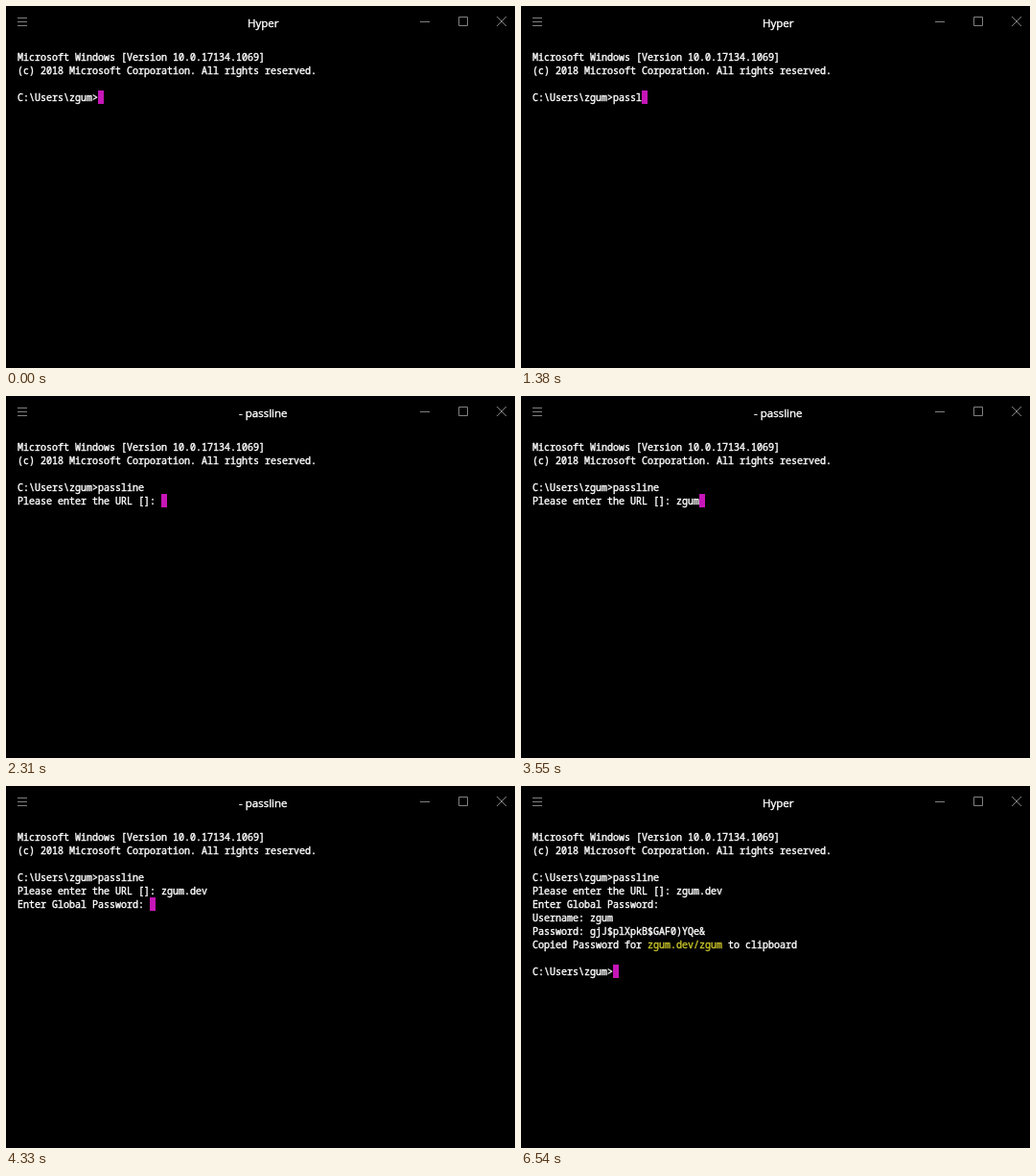
Write an HTML page that moves like this. It is 531 by 377 pixels and loops after 8 s.

```html
<!DOCTYPE html>
<html lang="en">
<head>
<meta charset="utf-8">
<title>Terminal</title>
<style>
  html, body {
    margin: 0;
    width: 100%;
    height: 100%;
    overflow: hidden;
    background: #000;
  }
  svg {
    position: absolute;
    left: 0;
    top: 0;
  }
  .icons {
    fill: none;
    stroke: #808080;
  }
  #title {
    fill: #fff;
    stroke: #fff;
    stroke-width: .4px;
    font: 500 11.5px "Open Sans", "Noto Sans", sans-serif;
    text-anchor: middle;
  }
  #screen {
    position: absolute;
    left: 12px;
    top: 46px;
    margin: 0;
    color: #fff;
    font: 500 10px/14px "Noto Sans Mono", "Liberation Mono", monospace;
    -webkit-text-stroke: .4px;
  }
  #link { color: #c7c329; }
  #cursor {
    display: inline-block;
    width: 6px;
    height: 14px;
    vertical-align: top;
    background: #c616b7;
  }
</style>
</head>
<body>
<svg width="531" height="377" viewBox="0 0 531 377">
  <g class="icons">
    <path d="M12 12.5h10M12 16.5h10M12 20.5h10"/>
    <path d="M432 16.5h10M472.5 11.5h9v9h-9z"/>
    <path d="M512 11l10 10M522 11l-10 10"/>
  </g>
  <text id="title" x="268.3" y="22">Hyper</text>
</svg>
<pre id="screen"><span id="before"></span><span id="link"></span><span id="after"></span><span id="cursor"></span></pre>
<script>
  const LOOP = 8000;
  const USER = "zgum";
  const SITE = USER + ".dev";
  const PROMPT = `C:\\Users\\${USER}>`;
  const BANNER = "Microsoft Windows [Version 10.0.17134.1069]\n" +
    "(c) 2018 Microsoft Corporation. All rights reserved.\n\n";

  const COMMAND_KEYS = [600, 750, 920, 1070, 1380, 1610, 1850, 1930];
  const SITE_KEYS = [3170, 3320, 3470, 3550, 3700, 3870, 3930, 4170];
  const START = 2080, ASK_URL = 2310, ASK_PASSWORD = 4330, ENTER = 6420, DONE = 6540;

  const el = id => document.getElementById(id);
  const typed = (text, keys, t) => text.slice(0, keys.filter(k => k <= t).length);

  function screenAt(t) {
    let before = BANNER + PROMPT + typed("passline", COMMAND_KEYS, t);
    if (t >= START) before += "\n";
    if (t >= ASK_URL) before += "Please enter the URL []: " + typed(SITE, SITE_KEYS, t);
    if (t >= ASK_PASSWORD) before += "\nEnter Global Password: ";
    if (t >= ENTER) before += "\n";
    if (t < DONE) return { before, link: "", after: "" };
    before += `Username: ${USER}\nPassword: gjJ$plXpkB$GAF0)YQe&\nCopied Password for `;
    return { before, link: `${SITE}/${USER}`, after: ` to clipboard\n\n${PROMPT}` };
  }

  function setText(id, text) {
    const node = el(id);
    if (node.textContent !== text) node.textContent = text;
  }

  function draw() {
    const t = performance.now() % LOOP;
    const parts = screenAt(t);
    for (const id in parts) setText(id, parts[id]);
    setText("title", t >= START && t < DONE ? "- passline" : "Hyper");
    requestAnimationFrame(draw);
  }
  draw();
</script>
</body>
</html>
```
